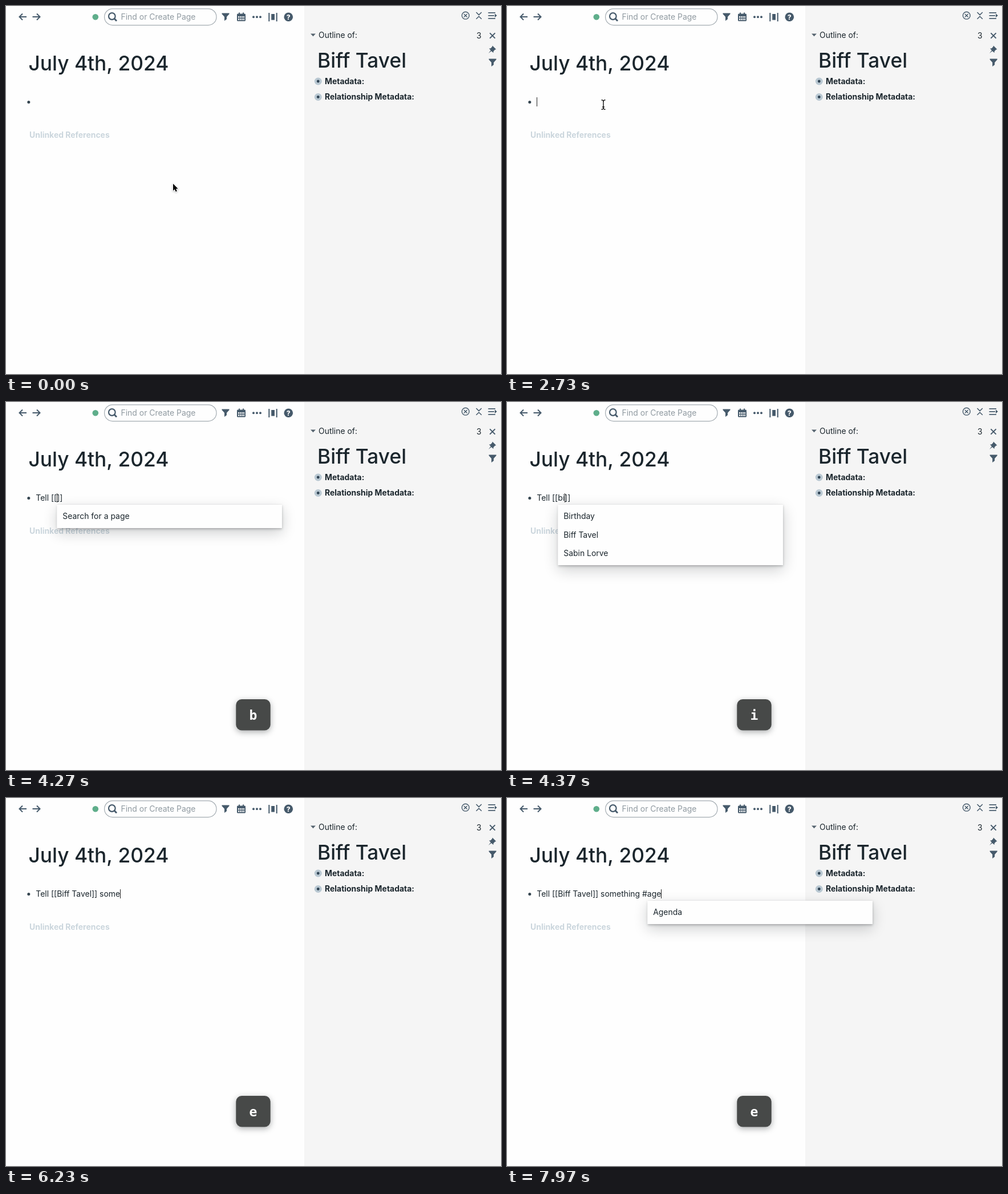
Animation, 868 px wide and 645 px high, one loop 8 s. Source, as an HTML page with a canvas:

```html
<!DOCTYPE html>
<html lang="en">
<head>
<meta charset="utf-8">
<title>Daily note</title>
<style>
  html, body { margin: 0; width: 100%; height: 100%; overflow: hidden; background: #fefefe; }
  canvas { display: block; width: 868px; height: 645px; }
</style>
</head>
<body>
<canvas id="stage"></canvas>
<script>
const W = 868, H = 645, LOOP = 8000;
const canvas = document.getElementById('stage');
const dpr = window.devicePixelRatio || 1;
canvas.width = W * dpr;
canvas.height = H * dpr;
const c = canvas.getContext('2d');

const SANS = 'Inter, sans-serif', MONO = '"DejaVu Sans Mono", monospace';
const INK = '#1b262d', ICON = '#465a6b', SIZE = 13.95, TITLE = 35.3;
const NAME = 'Biff Tavel';

// [time, key, delay before the text follows]
const KEYS = [
  [2930, 'T', 30], [3070, 'e', 30], [3170, 'l', 30], [3300, 'l', 30], [3500, ' ', 0],
  [3970, '[', 0], [4100, '[', 30], [4270, 'b', 30], [4370, 'i', 0], [4500, 'f', 30], [4670, 'f', 0],
  [4970, '↩', 30], [5570, ' ', 30],
  [5800, 's', 30], [5870, 'o', 30], [5940, 'm', 30], [6040, 'e', 30],
  [6430, 't', 30], [6570, 'h', 30], [6700, 'i', 30], [6830, 'n', 30], [7000, 'g', 30],
  [7170, ' ', 30], [7530, '#', 0], [7770, 'a', 30], [7870, 'g', 30], [7940, 'e', 30]
];

// [from, to, text before the popup, rows]
const POPUPS = [
  [4130, 4300, 'Tell [[', ['Search for a page']],
  [4300, 4530, 'Tell [[', ['Birthday', NAME, 'Sabin Lorve']],
  [4530, 5000, 'Tell [[', [NAME]],
  [7830, LOOP, `Tell [[${NAME}]] something #`, ['Agenda']]
];

const MOUSE = [[0, 293, 311.5], [600, 201, 200], [770, 201, 200], [1170, 169, 173]];

function text(s, x, y, size = SIZE, weight = 400, color = INK, family = SANS) {
  c.font = `${weight} ${size}px ${family}`;
  c.fillStyle = color;
  c.fillText(s, x, y);
}

function widthOf(s) {
  c.font = `400 ${SIZE}px ${SANS}`;
  return c.measureText(s).width;
}

function trace(pts) {
  c.beginPath();
  pts.forEach(([x, y], i) => i ? c.lineTo(x, y) : c.moveTo(x, y));
}

function line(pts, width = 2, color = ICON) {
  trace(pts);
  c.lineWidth = width;
  c.strokeStyle = color;
  c.stroke();
}

function poly(pts, color = ICON) {
  trace(pts);
  c.closePath();
  c.fillStyle = color;
  c.fill();
}

function disc(x, y, r, color = ICON) {
  c.beginPath();
  c.arc(x, y, r, 0, 7);
  c.fillStyle = color;
  c.fill();
}

function ring(x, y, r, width, color = ICON) {
  c.beginPath();
  c.arc(x, y, r, 0, 7);
  c.lineWidth = width;
  c.strokeStyle = color;
  c.stroke();
}

function rect(x, y, w, h, color = ICON) {
  c.fillStyle = color;
  c.fillRect(x, y, w, h);
}

function shadow(alpha, blur, dy) {
  c.shadowColor = `rgba(16,22,26,${alpha})`;
  c.shadowBlur = blur * dpr;
  c.shadowOffsetY = dy * dpr;
}

function cross(x, y, r, width) {
  line([[x - r, y - r], [x + r, y + r]], width);
  line([[x - r, y + r], [x + r, y - r]], width);
}

function arrow(x, tip) {
  const d = Math.sign(tip - x);
  line([[x, 19], [tip, 19]]);
  line([[tip - d * 5.5, 13.5], [tip, 19], [tip - d * 5.5, 24.5]]);
}

function funnel(x, y) {
  poly([[x - 6.5, y - 6.5], [x + 6.5, y - 6.5], [x + 6.5, y - 5], [x + 2, y], [x + 2, y + 4],
        [x - 2, y + 7], [x - 2, y], [x - 6.5, y - 5]]);
}

function calendar(x, y) {
  c.beginPath();
  c.roundRect(x, y + 2, 15, 13, 1.5);
  c.fillStyle = ICON;
  c.fill();
  rect(x + 3, y, 2, 4);
  rect(x + 10, y, 2, 4);
  for (let i = 0; i < 8; i++) rect(x + 2 + (i % 4) * 3, y + 6.5 + (i >> 2) * 4, 2, 2.6, '#fefefe');
}

function toolbar() {
  arrow(36, 23.5);
  arrow(46.5, 59.5);
  disc(156.8, 19.2, 5.3, '#5fae8b');

  c.beginPath();
  c.roundRect(172.6, 4.8, 196.4, 28.8, 14.4);
  c.lineWidth = 1.2;
  c.strokeStyle = '#a3abb1';
  c.stroke();
  ring(185.8, 18, 5.8, 2.2);
  line([[190, 22.2], [194, 26.2]], 2.8);
  text('Find or Create Page', 201.5, 24, SIZE, 400, '#909aa1');

  funnel(385, 19);
  calendar(405, 11.5);
  [434, 440, 446].forEach(x => disc(x, 19.3, 2));
  rect(460.3, 12, 2, 15);
  rect(473.7, 12, 2, 15);
  rect(465.2, 14, 5.8, 10.5);
  disc(495.3, 19.2, 7.8);
  c.textAlign = 'center';
  text('?', 495.3, 23.6, 12, 800, '#fefefe');
  c.textAlign = 'left';
}

function sidebar() {
  rect(523, 0, W - 523, H, '#f5f5f5');
  ring(805.8, 16.7, 6.4, 1.4);
  cross(805.8, 16.7, 2.8, 1.4);
  line([[824.5, 11], [829.2, 15.6], [833.9, 11]], 1.5);
  line([[824.5, 22.8], [829.2, 18.2], [833.9, 22.8]], 1.5);
  rect(845.5, 11, 12.5, 1.7);
  rect(845.5, 16, 10.5, 1.7);
  rect(845.5, 21, 12.5, 1.7);
  poly([[857, 13.5], [861, 16.8], [857, 20]]);

  poly([[534, 48.5], [543, 48.5], [538.5, 53.3]], '#56646f');
  text('Outline of:', 548, 56);
  text('3', 825, 57);
  cross(853, 52, 4.6, 2);
  poly([[853, 69.5], [859.5, 76], [857.5, 76.6], [854.8, 79.2], [854.6, 82], [851, 78.9], [846, 83],
        [850, 77.8], [847, 74.4], [849.8, 74.2], [852.4, 71.5]]);
  funnel(853.2, 99);

  text(NAME, 546, 107.8, TITLE, 500);
  [['Metadata:', 132], ['Relationship Metadata:', 159.5]].forEach(([s, y]) => {
    disc(547.3, y, 6.5, '#b9c8d2');
    disc(547.3, y, 2.4, '#2f4353');
    text(s, 559, y + 4.9, SIZE, 700);
  });
}

function typedAt(t) {
  let pre = '', post = '', key = null, since = 0;
  for (const [at, k, lag] of KEYS) {
    if (t >= at) { key = k; since = at; }
    if (t < at + lag) break;
    if (k === '↩') { pre = `Tell [[${NAME}]]`; post = ''; }
    else {
      pre += k;
      if (k === '[') post += ']';
    }
  }
  return { pre, post, key, since };
}

function block(t, { pre, post }) {
  disc(39.8, 168.5, 2.5, '#34444f');
  text(pre + post, 52.3, 173);
  const lit = t >= 1600 && !(t >= 2270 && t < 2730);
  if (lit) rect(Math.round(52 + widthOf(pre)), 160, 1, 16, '#222');
}

function popup(t) {
  const p = POPUPS.find(([a, b]) => t >= a && t < b);
  if (!p) return;
  const x = Math.round(52.3 + widthOf(p[2])) + 0.5, h = p[3].length * 32.5 + 8.5;
  c.save();
  for (const [a, blur, dy] of [[0.2, 24, 8], [0.25, 4, 1.5], [0.25, 1, 0]]) {
    shadow(a, blur, dy);
    rect(x, 180, 394.5, h, '#fefefe');
  }
  c.restore();
  p[3].forEach((s, i) => text(s, x + 9.7, 205.3 + i * 32.5));
}

function keycap({ key, since }) {
  if (!key) return;
  const y = since < 5570 ? 521 : 522;
  c.save();
  shadow(0.35, 11, 3);
  c.beginPath();
  c.roundRect(403.3, y, 60.4, 54.5, 10);
  c.fillStyle = '#474948';
  c.fill();
  c.restore();
  if (key === ' ') {
    line([[428.7, y + 34], [428.7, y + 37.5], [437.8, y + 37.5], [437.8, y + 34]], 2.2, '#fff');
    return;
  }
  c.textAlign = 'center';
  text(key, 433.4, y + 36, 23, 700, '#fff', MONO);
  c.textAlign = 'left';
}

function pointer(x, y) {
  const pts = [[0, 0], [0, 12.2], [2.8, 9.7], [4.7, 14], [6.8, 13.1], [5, 9], [8.6, 8.7]];
  const shape = pts.map(([a, b]) => [x + a, y + b]);
  c.save();
  c.lineJoin = 'round';
  shadow(0.3, 3, 1);
  trace(shape);
  c.closePath();
  c.lineWidth = 2;
  c.strokeStyle = '#fff';
  c.stroke();
  c.restore();
  poly(shape, '#000');
}

function ibeam(x, y) {
  const draw = (w, color) => {
    line([[x, y - 6.5], [x, y + 6.5]], w, color);
    [-1, 1].forEach(d => {
      line([[x - 3.5, y + d * 8.3], [x - 1.5, y + d * 8.1], [x, y + d * 6.3],
            [x + 1.5, y + d * 8.1], [x + 3.5, y + d * 8.3]], w, color);
    });
    line([[x - 2, y + 4], [x + 2, y + 4]], w, color);
  };
  draw(3, '#fff');
  draw(1.4, '#111');
}

function mouse(t) {
  if (t >= 2930) return;
  let [, x, y] = MOUSE[MOUSE.length - 1];
  for (let i = 1; i < MOUSE.length; i++) {
    const [t0, x0, y0] = MOUSE[i - 1], [t1, x1, y1] = MOUSE[i];
    if (t >= t1) continue;
    const u = Math.max(0, (t - t0) / (t1 - t0)), e = u * u * (3 - 2 * u);
    x = x0 + (x1 - x0) * e;
    y = y0 + (y1 - y0) * e;
    break;
  }
  (y < 185 ? ibeam : pointer)(x, y);
}

function frame(now) {
  const t = now % LOOP, typed = typedAt(t);
  c.setTransform(dpr, 0, 0, dpr, 0, 0);
  rect(0, 0, W, H, '#fefefe');
  toolbar();
  sidebar();
  text('July 4th, 2024', 39.5, 112.8, TITLE, 500);
  text('Unlinked References', 41, 230.5, SIZE, 700, '#cbd6dd');
  block(t, typed);
  popup(t);
  keycap(typed);
  mouse(t);
  requestAnimationFrame(frame);
}
requestAnimationFrame(frame);
</script>
</body>
</html>
```
